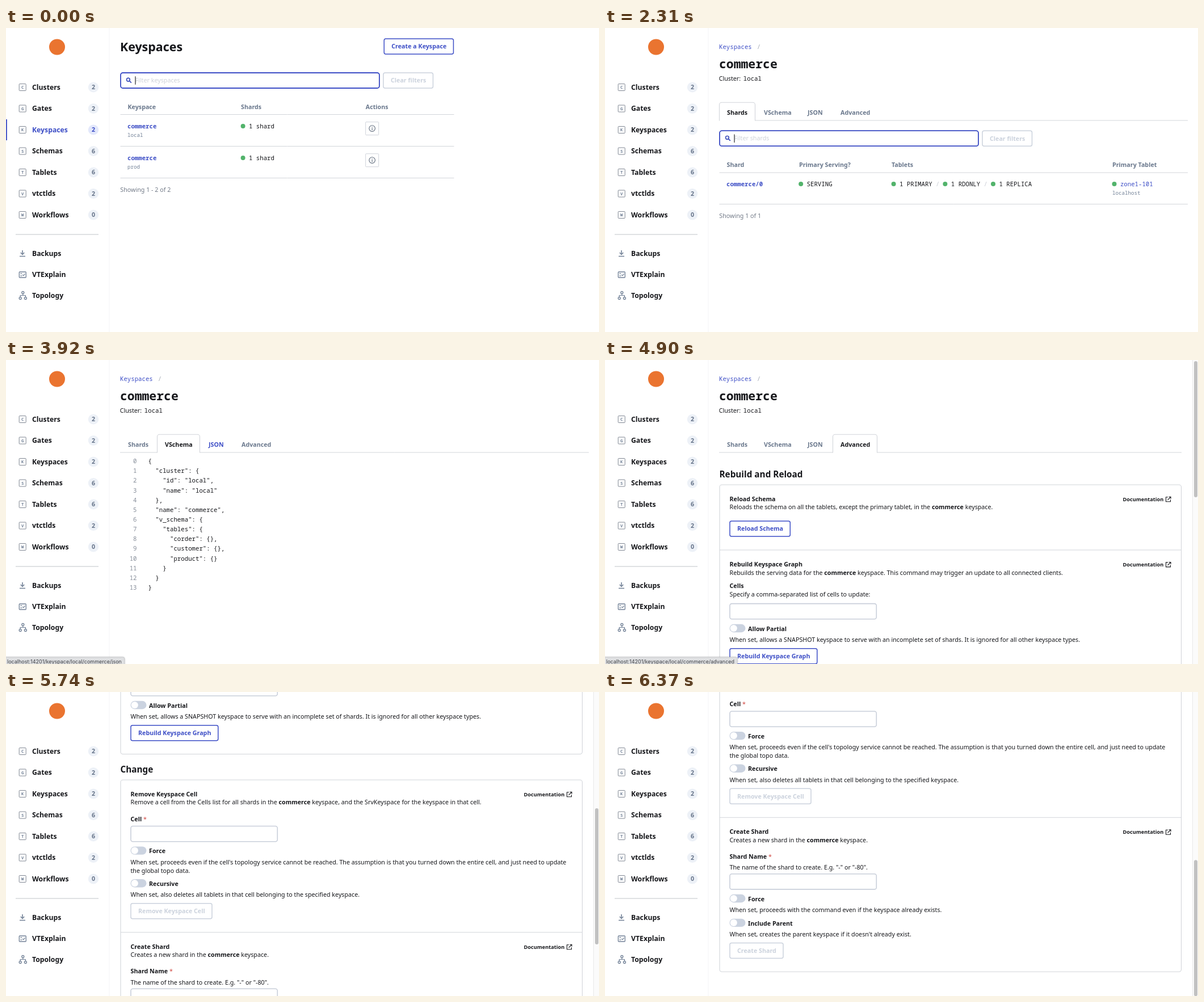
An HTML page with a canvas that plays this animation: 1045x536 px, repeating every 7000 ms.

```html
<!DOCTYPE html>
<html lang="en">
<head>
<meta charset="utf-8">
<title>Keyspaces</title>
<style>
html, body { margin: 0; width: 100%; height: 100%; overflow: hidden; background: #fff; }
canvas { display: block; width: 1045px; height: 536px; }
</style>
</head>
<body>
<canvas id="stage" width="1045" height="536"></canvas>
<script>
const ctx = document.getElementById('stage').getContext('2d');
const W = 1045, H = 536, LOOP = 7000, STEP = 70;
const SANS = '"Noto Sans", sans-serif', MONO = '"Noto Sans Mono", monospace';
const BLUE = '#3d4ec6', INK = '#16171b', GRAY = '#718096', PALE = '#cbd2dd', LINE = '#d2d5da', GREEN = '#52b36b';
const BASE = 10.71, SMALL = 9.18;

// y is the middle of the capital letters
function text(str, x, y, o = {}) {
  const size = o.size || BASE;
  ctx.font = `${o.weight || 400} ${size}px ${o.family || SANS}`;
  ctx.fillStyle = o.color || INK;
  ctx.textAlign = o.align || 'left';
  ctx.fillText(str, x, y + size * 0.36);
  return ctx.measureText(str).width;
}
const bold = (str, x, y, color) => text(str, x, y, { weight: 700, color });
const semi = (str, x, y, color) => text(str, x, y, { weight: 600, color });
const mono = (str, x, y, o) => text(str, x, y, { family: MONO, ...o });

// Words between | marks are bold
function rich(str, x, y) {
  str.split('|').forEach((part, i) => { x += text(part, x, y, { weight: i % 2 ? 700 : 400 }); });
}

function line(x1, y1, x2, y2, color = LINE, width = 1) {
  path([[x1, y1], [x2, y2]], color, width);
}

function path(points, color, width = 1) {
  ctx.beginPath();
  points.forEach(([x, y]) => ctx.lineTo(x, y));
  ctx.strokeStyle = color;
  ctx.lineWidth = width;
  ctx.stroke();
}

function box(x, y, w, h, r, stroke, width = 1, fill) {
  ctx.beginPath();
  ctx.roundRect(x, y, w, h, r);
  if (fill) { ctx.fillStyle = fill; ctx.fill(); }
  if (stroke) { ctx.strokeStyle = stroke; ctx.lineWidth = width; ctx.stroke(); }
}

function circle(x, y, r, fill, stroke, width = 1) {
  box(x - r, y - r, 2 * r, 2 * r, r, stroke, width, fill);
}

function button(label, x, y, w, off) {
  box(x, y, w, 27, 3, off ? PALE : BLUE, 1.5);
  bold(label, x + 13, y + 13.5, off ? PALE : BLUE);
}

function withAlpha(a, draw) {
  if (a <= 0) return;
  ctx.globalAlpha = Math.min(a, 1);
  draw();
  ctx.globalAlpha = 1;
}

function letterIcon(letter, y) {
  box(23.2, y - 6, 12, 12, 1, '#808793');
  mono(letter, 29.2, y, { size: 7.4, weight: 600, color: GRAY, align: 'center' });
}

function downloadIcon(y) {
  line(29, y - 6, 29, y + 1, GRAY, 1.6);
  path([[25.8, y - 2], [29, y + 1.4], [32.2, y - 2]], GRAY, 1.5);
  line(24, y + 4.5, 34, y + 4.5, GRAY, 1.5);
}

function checklistIcon(y) {
  box(23.3, y - 5, 12, 10, 1, GRAY, 1.3);
  line(25.2, y - 2, 28.4, y - 2, GRAY, 1.2);
  line(25.2, y + 2, 28.4, y + 2, GRAY, 1.2);
  path([[29.3, y], [30.8, y + 1.6], [33.7, y - 1.6]], GRAY, 1.2);
}

function treeIcon(y) {
  for (const [x, dy] of [[29.8, -5], [25.2, 5], [34.4, 5]]) circle(x, y + dy, 2, null, GRAY, 1.3);
  line(29.8, y - 3, 29.8, y, GRAY, 1.2);
  path([[25.2, y + 3], [25.2, y], [34.4, y], [34.4, y + 3]], GRAY, 1.2);
}

function sidebar(onList) {
  line(182, 0, 182, H, '#f4f4f6');
  circle(90, 33.5, 14, '#ea7430');
  const items = ['Clusters 2', 'Gates 2', 'Keyspaces 2', 'Schemas 6', 'Tablets 6', 'vtctlds 2', 'Workflows 0'];
  items.forEach((item, i) => {
    const [name, count] = item.split(' '), y = 104.5 + 37.5 * i;
    const active = onList && i === 2;
    if (active) { ctx.fillStyle = BLUE; ctx.fillRect(0, y - 18.5, 1.8, 37); }
    letterIcon(name[0].toUpperCase(), y);
    text(name, 46, y, { size: 12.24, weight: 600, color: active ? BLUE : INK });
    box(144.8, y - 9, 18.4, 18, 9, null, 0, active ? '#e3e8fb' : '#edf1f7');
    text(count, 154, y, { weight: 600, align: 'center', color: active ? BLUE : '#66748a' });
  });
  line(17, 364, 163, 364, '#d5d7da', 1.4);
  [['Backups', 398, downloadIcon], ['VTExplain', 435, checklistIcon], ['Topology', 471.5, treeIcon]]
    .forEach(([name, y, icon]) => {
      icon(y);
      text(name, 46, y, { size: 12.24, weight: 600 });
    });
}

function filter(label, y, focus, caret) {
  const draw = color => {
    circle(215.4, y - 1.2, 2.9, null, color, 1.4);
    line(217.5, y + 1, 220.8, y + 4.2, color, 1.6);
  };
  box(202, y - 13.3, 456, 27, 4, '#c5cbd6', 1.6);
  draw(GRAY);
  withAlpha(focus, () => {
    box(202, y - 13.3, 456, 27, 4, BLUE, 1.8);
    draw(BLUE);
  });
  text(label, 227.5, y, { color: '#cdd1d9' });
  if (caret) line(228, y - 7, 228, y + 7.5, INK, 1.1);
  button('Clear filters', 665, y - 13.3, 87.5, true);
}

function dotLabel(label, x, y, color) {
  circle(x, y, 4, GREEN);
  mono(label, x + 10.4, y, { color });
}

function headings(labels, y) {
  labels.forEach(([label, x]) => semi(label, x, y, '#69778c'));
}

function listPage(t) {
  text('Keyspaces', 201, 33.5, { size: 21.42, weight: 700 });
  button('Create a Keyspace', 666.3, 19, 122.2);
  const focus = t < 1190 ? 1 : 1 - (t - 1120) / 280;
  filter('Filter keyspaces', 92.3, focus, t < 280 || (t >= 770 && t < 1190));
  headings([['Keyspace', 214.5], ['Shards', 414], ['Actions', 633.8]], 139.5);
  line(201.5, 152.5, 789.5, 152.5);
  ['local', 'prod'].forEach((cluster, i) => {
    const y = 173 + 56 * i;
    mono('commerce', 214, y, { weight: 600, color: BLUE });
    mono(cluster, 214, y + 15.2, { size: SMALL, color: GRAY });
    dotLabel('1 shard', 417.6, y);
    box(633.7, y - 7.3, 23, 23, 1, '#cfd3da');
    circle(645.2, y + 4.1, 5.3, null, '#5f6b7c', 1.1);
    line(645.2, y + 3.4, 645.2, y + 7, '#5f6b7c', 1.2);
    line(645.2, y + 1.2, 645.2, y + 2.4, '#5f6b7c', 1.2);
    line(201.5, y + 35.5, 789.5, y + 35.5);
  });
  if (t >= 1190 && t < 1960) {
    withAlpha((t - 1120) / 280, () => box(631.4, 163.3, 27.4, 27.4, 0, '#5160cc', 1.8));
  }
  text('Showing 1 - 2 of 2', 201.3, 284.8, { color: '#737b88' });
}

const TABS = [['Shards', 215, 36], ['VSchema', 280, 48], ['JSON', 357, 26.5], ['Advanced', 415, 51]];

function pageHead(active, hover, right) {
  const link = mono('Keyspaces', 201, 33.5, { color: BLUE });
  mono('/', 201 + link + 9, 33.5, { color: '#a5abb6' });
  mono('commerce', 201, 63.7, { size: 21.42, weight: 600 });
  text('Cluster:', 200.7, 89.3);
  mono('local', 243.8, 89.3);
  TABS.forEach(([name, x, w], i) => {
    const color = i === hover ? BLUE : i === active ? INK : '#69778c';
    semi(name, x, 149.3, color);
    if (i !== active) return;
    const l = x - 13.5, r = x + w + 13.5;
    line(201, 163, l, 163);
    line(r, 163, right, 163);
    ctx.beginPath();
    ctx.moveTo(l, 163.5);
    ctx.arcTo(l, 131.3, r, 131.3, 4);
    ctx.arcTo(r, 131.3, r, 163.5, 4);
    ctx.lineTo(r, 163.5);
    ctx.strokeStyle = LINE;
    ctx.lineWidth = 1.1;
    ctx.stroke();
  });
}

function shardsPage(t) {
  filter('Filter shards', 194.5, 1, t < 2590);
  headings([['Shard', 214.5], ['Primary Serving?', 342], ['Tablets', 505], ['Primary Tablet', 894]], 241.6);
  line(201.5, 255, 1027, 255);
  mono('commerce/0', 214, 275, { weight: 600, color: BLUE });
  dotLabel('SERVING', 345.2, 275);
  dotLabel('1 PRIMARY', 508.6, 275);
  dotLabel('1 RDONLY', 599.4, 275);
  dotLabel('1 REPLICA', 684, 275);
  for (const x of [583, 667.5]) mono('/', x, 275, { color: '#c9cdd5' });
  dotLabel('zone1-101', 897.5, 275, BLUE);
  mono('localhost', 894, 290.5, { size: SMALL, color: GRAY });
  line(201.5, 310.6, 1027, 310.6);
  text('Showing 1 of 1', 201.3, 331.2, { color: '#737b88' });
}

const cluster = { id: 'local', name: 'local' };
const vschema = {
  cluster,
  name: 'commerce',
  v_schema: { tables: { corder: {}, customer: {}, product: {} } }
};
const keyspace = {
  cluster,
  keyspace: {
    name: 'commerce',
    keyspace: {
      served_froms: [], keyspace_type: 0, base_keyspace: '', snapshot_time: null,
      durability_policy: 'semi_sync', throttler_config: null, sidecar_db_name: '_vt'
    }
  },
  shards: {
    0: {
      keyspace: 'commerce', name: '0',
      shard: { primary_alias: { cell: 'zone1', uid: 101 }, key_range: null, is_primary_serving: true }
    }
  }
};

function code(data) {
  JSON.stringify(data, null, 2).split('\n').forEach((row, i) => {
    const y = 178.2 + 17.16 * i;
    mono(String(i), 230.5, y, { align: 'right', color: '#868d99' });
    mono(row, 250.5, y);
  });
}

function docLink(y) {
  text('Documentation', 912.5, y, { size: SMALL, weight: 700 });
  path([[992, y - 3.6], [988.5, y - 3.6], [988.5, y + 4.4], [996.5, y + 4.4], [996.5, y + 1]], INK, 1.1);
  path([[993.5, y - 4], [997, y - 4], [997, y - 0.5]], INK, 1.1);
  line(991.5, y + 1.5, 996.8, y - 3.8, INK, 1.1);
}

function section(title, desc, y) {
  bold(title, 219.5, y);
  rich(desc, 219.5, y + 14.6);
  docLink(y + 0.3);
}

function panel(title, titleY, top, divider, bottom) {
  text(title, 201.5, titleY, { size: 15.3, weight: 700 });
  box(202, top, 813.5, bottom - top, 4, LINE, 1.1);
  line(202, divider, 1015.5, divider, LINE, 1.1);
}

function toggle(label, note, y) {
  box(219.5, y - 7.2, 28, 14.4, 7.2, null, 0, '#cbd3e0');
  circle(226.8, y, 6.1, '#fff');
  bold(label, 252, y + 0.8);
  text(note, 219.5, y + 20.4);
}

function field(y) {
  box(220, y, 258.3, 27.2, 3.5, '#c9cfda', 1.6);
}

function required(label, y) {
  const w = bold(label, 219.5, y);
  text('*', 219.5 + w + 2.8, y, { color: '#d0453f' });
}

function advancedPage() {
  panel('Rebuild and Reload', 201.7, 220, 335, 559.5);
  section('Reload Schema', 'Reloads the schema on all the tablets, except the primary tablet, in the |commerce| keyspace.', 245);
  button('Reload Schema', 220, 284, 106.3);
  section('Rebuild Keyspace Graph', 'Rebuilds the serving data for the |commerce| keyspace. This command may trigger an update to all connected clients.', 360.2);
  bold('Cells', 219.5, 398.6);
  text('Specify a comma-separated list of cells to update:', 219.5, 413.2);
  field(429.6);
  toggle('Allow Partial', 'When set, allows a SNAPSHOT keyspace to serve with an incomplete set of shards. It is ignored for all other keyspace types.', 473);
  button('Rebuild Keyspace Graph', 220, 508.7, 153.8);

  panel('Change', 586.5, 605, 873.7, 1145.7);
  section('Remove Keyspace Cell', 'Remove a cell from the Cells list for all shards in the |commerce| keyspace, and the SrvKeyspace for the keyspace in that cell.', 630);
  required('Cell', 673.7);
  field(686.5);
  toggle('Force', "When set, proceeds even if the cell's topology service cannot be reached. The assumption is that you turned down the entire cell, and just need to update", 729.6);
  text('the global topo data.', 219.5, 764.8);
  toggle('Recursive', 'When set, also deletes all tablets in that cell belonging to the specified keyspace.', 787.2);
  button('Remove Keyspace Cell', 220, 822.7, 143, true);
  section('Create Shard', 'Creates a new shard in the |commerce| keyspace.', 899);
  required('Shard Name', 942.2);
  text('The name of the shard to create. E.g. "-" or "-80".', 219.5, 961.8);
  field(973.2);
  toggle('Force', 'When set, proceeds with the command even if the keyspace already exists.', 1016.5);
  toggle('Include Parent', "When set, creates the parent keyspace if it doesn't already exist.", 1059.4);
  button('Create Shard', 220, 1095, 94, true);
}

function scrollbar(top, length) {
  ctx.fillStyle = '#fbfbfb';
  ctx.fillRect(1035, 0, 10, H);
  line(1035.5, 0, 1035.5, H, '#e9e9e9');
  box(1038, top, 6, length, 3, null, 0, '#c1c1c1');
}

function statusBar(page) {
  const url = 'localhost:14201/keyspace/local/commerce/' + page;
  const style = { size: 9, family: 'Inter, sans-serif', color: '#3f4145' };
  ctx.font = `400 9px ${style.family}`;
  const w = ctx.measureText(url).width + 7;
  ctx.save();
  ctx.shadowColor = 'rgba(0,0,0,0.3)';
  ctx.shadowBlur = 3;
  box(-4, 524, w + 4, 20, 3, null, 0, '#dfe0e2');
  ctx.restore();
  box(-4, 524, w + 4, 20, 3, '#c3c4c7', 0.8);
  text(url, 2, 532.2, style);
}

const SCROLL = [[5110, 0], [5180, 3], [5320, 18], [5460, 45.5], [5530, 58], [5600, 58], [5670, 230],
  [5740, 450], [5810, 600], [5880, 648.5], [6090, 651.5], [6370, 652.5]];

function scrollAt(t) {
  const i = SCROLL.findIndex(p => p[0] > t);
  if (i === 0) return 0;
  if (i < 0) return SCROLL[SCROLL.length - 1][1];
  const [t0, a] = SCROLL[i - 1], [t1, b] = SCROLL[i];
  return a + (b - a) * (t - t0) / (t1 - t0);
}

// Last entry whose start time has passed
const latest = (track, t) => track.reduce((v, [start, value]) => t >= start ? value : v, null);
const PAGES = [[2100, 0], [3010, 1], [3990, 2], [4760, 3]];
const HOVERS = [[2730, 1], [3080, null], [3290, 3], [3500, 2], [4060, null], [4270, 3], [4900, null]];
const STATUS = [[2730, 'vschema'], [3290, 'advanced'], [3500, 'json'], [4270, 'advanced'], [5180, null]];

function draw(t) {
  ctx.fillStyle = '#fff';
  ctx.fillRect(0, 0, W, H);
  const page = latest(PAGES, t);
  sidebar(page === null);
  if (page === null) return listPage(t);

  const scroll = scrollAt(t);
  ctx.save();
  ctx.translate(0, -scroll);
  pageHead(page, latest(HOVERS, t), page > 1 ? 1016 : 1027);
  [() => shardsPage(t), () => code(vschema), () => code(keyspace), advancedPage][page]();
  ctx.restore();
  if (page === 2) scrollbar(2, 390);
  if (page === 3) scrollbar(2 + scroll * 0.451, 240);
  const status = latest(STATUS, t);
  if (status) statusBar(status);
}

const begin = performance.now();
function tick() {
  const t = (performance.now() - begin) % LOOP;
  draw(Math.floor(t / STEP) * STEP);
  requestAnimationFrame(tick);
}
tick();
</script>
</body>
</html>
```
